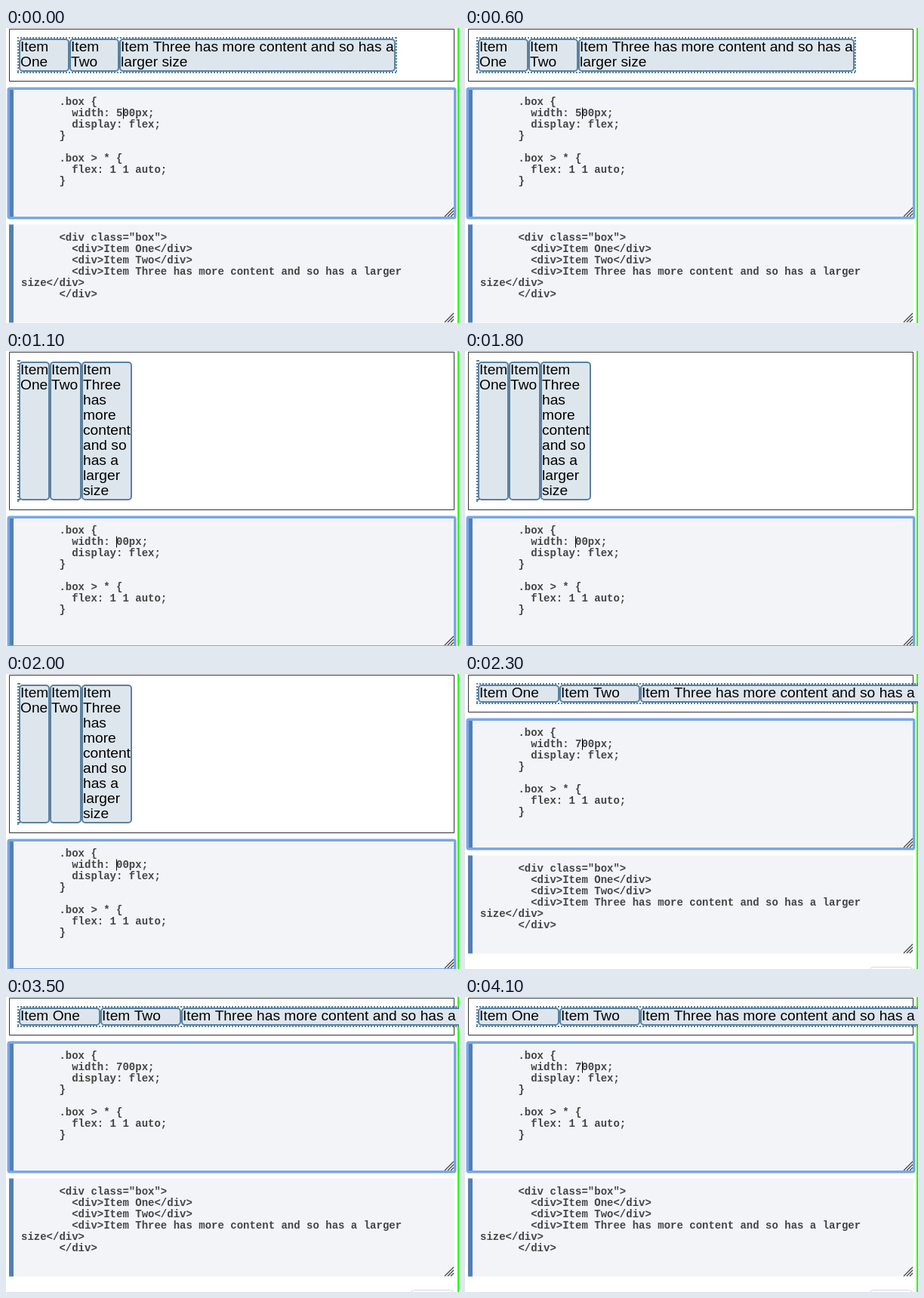
Animation, 600 px wide and 391 px high, one loop 4.2 s. Source, as an HTML page with a canvas:

```html
<!DOCTYPE html>
<html lang="en">
<head>
<meta charset="utf-8">
<title>Flex basis demo</title>
<style>
  html, body { margin: 0; width: 100%; height: 100%; overflow: hidden; background: #fff; }
  canvas { display: block; }
</style>
</head>
<body>
<canvas id="stage" width="600" height="391"></canvas>
<script>
const ctx = document.getElementById('stage').getContext('2d');
const LOOP = 4200;
const STEEL = '#5b819f';
const BLINKS = [100, 600, 1200, 1800, 2400, 2900, 3500, 4100];

// rows: text lines in the tallest item; edges: left/right sides of the items
const states = [
  { from: 0, width: '500', size: 499, rows: 2, edges: [17, 84, 150, 516], caret: 155,
    items: ['Item|One', 'Item|Two', 'Item Three has more content and so has a|larger size'] },
  { from: 1100, width: '00', size: 0, rows: 9, edges: [17, 58, 100, 167], caret: 146,
    items: ['Item|One', 'Item|Two', 'Item|Three|has|more|content|and so|has a|larger|size'] },
  { from: 2300, width: '700', size: 699, rows: 1, edges: [17, 125, 232, 716], caret: 155,
    items: ['Item One', 'Item Two', 'Item Three has more content and so has a larger size'] }
];

const css = width => `      .box {
        width: ${width}px;
        display: flex;
      }

      .box > * {
        flex: 1 1 auto;
      }`;

const html = `      <div class="box">
        <div>Item One</div>
        <div>Item Two</div>
        <div>Item Three has more content and so has a larger
size</div>
      </div>`;

function rect(x, y, w, h, color) {
  ctx.fillStyle = color;
  ctx.fillRect(x, y, w, h);
}

function outline(x, y, w, h, radius, color, line, fill) {
  ctx.beginPath();
  ctx.roundRect(x, y, w, h, radius);
  if (fill) {
    ctx.fillStyle = fill;
    ctx.fill();
  }
  ctx.strokeStyle = color;
  ctx.lineWidth = line;
  ctx.stroke();
}

// Each side starts its dots at the outer corner
function dottedBox(x, y, w, h) {
  ctx.setLineDash([2, 2]);
  ctx.strokeStyle = STEEL;
  ctx.lineWidth = 2;
  ctx.beginPath();
  for (const dy of [1, h - 1]) {
    ctx.moveTo(x, y + dy);
    ctx.lineTo(x + w, y + dy);
  }
  for (const dx of [1, w - 1]) {
    ctx.moveTo(x + dx, y);
    ctx.lineTo(x + dx, y + h);
  }
  ctx.stroke();
  ctx.setLineDash([]);
}

function write(lines, x, y, step, font, color) {
  ctx.font = font;
  ctx.fillStyle = color;
  lines.forEach((line, i) => ctx.fillText(line, x, y + i * step));
}

function editor(y, h, code) {
  rect(4, y, 590, h, '#f3f4f8');
  rect(4, y, 6, h, '#527fb6');
  write(code.split('\n'), 20, y + 21.5, 15, 'bold 14px "Liberation Mono", monospace', '#444');
  const bottom = y + h - 0.5;
  ctx.strokeStyle = '#444';
  ctx.lineWidth = 1.2;
  ctx.beginPath();
  for (const d of [12, 8, 4]) {
    ctx.moveTo(593 - d, bottom);
    ctx.lineTo(593, bottom - d);
  }
  ctx.stroke();
}

function preview(s) {
  const h = s.rows * 20 + 4;
  outline(4.5, 1.5, 589, h + 25, 0, '#333', 1);
  dottedBox(15, 12, s.size + 4, h + 4);
  s.items.forEach((text, i) => {
    const x = s.edges[i], w = s.edges[i + 1] - x;
    outline(x + 1, 15, w - 2, h - 2, 4, STEEL, 2, '#dee6ed');
    write(text.split('|'), x + 2, 31, 20, '19.2px "Liberation Sans", sans-serif', '#000');
  });
}

function draw(now) {
  const t = now % LOOP;
  const s = states.findLast(state => t >= state.from);
  const caretOn = BLINKS.filter(b => t >= b).length % 2 === 0;
  const top = s.rows * 20 + 40.5;

  rect(0, 0, 600, 391, '#fff');
  rect(598, 0, 2, 391, '#26ff00');
  preview(s);
  editor(top, 170, css(s.width));
  outline(3.25, top - 0.25, 591.5, 171.5, 2, '#78a7e8', 3.5);
  if (caretOn) rect(s.caret, top + 25, 1, 15, '#000');
  editor(top + 180, 130, html);
  outline(536.5, top + 328, 56, 24, 4, '#d8d8d8', 1);
}

function tick() {
  draw(performance.now());
  requestAnimationFrame(tick);
}
tick();
</script>
</body>
</html>
```
